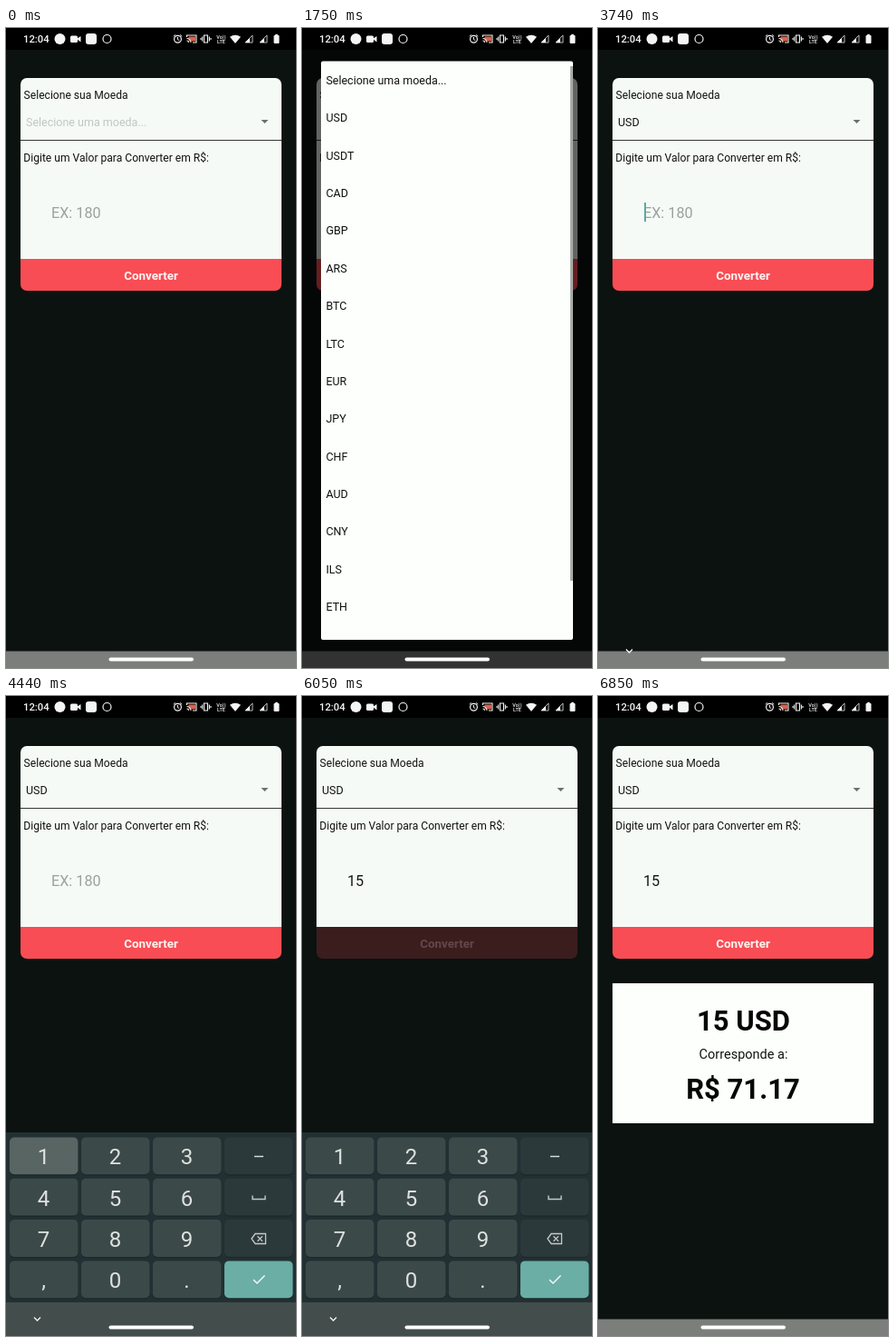
An HTML page with a canvas that plays this animation: 320x704 px, repeating every 8 s.

```html
<!DOCTYPE html>
<html lang="pt">
<head>
<meta charset="utf-8">
<title>Conversor de moedas</title>
<style>
  html, body { margin: 0; width: 100%; height: 100%; overflow: hidden; background: #0b1210; }
  canvas { display: block; }
</style>
</head>
<body>
<canvas id="stage" width="320" height="704"></canvas>
<script>
const ctx = document.getElementById('stage').getContext('2d');
const LOOP = 8000;
const ITEMS = ['Selecione uma moeda...', 'USD', 'USDT', 'CAD', 'GBP', 'ARS', 'BTC', 'LTC',
  'EUR', 'JPY', 'CHF', 'AUD', 'CNY', 'ILS', 'ETH'];
const KEYS = ['1', '2', '3', 'minus', '4', '5', '6', 'space', '7', '8', '9', 'back', ',', '0', '.', 'done'];

const within = (t, a, b) => t >= a && t < b;
const ramp = (t, a, b) => Math.min(1, Math.max(0, (t - a) / (b - a)));
const easeOut = p => 1 - (1 - p) ** 2;

function box(x, y, w, h, radius, fill) {
  ctx.fillStyle = fill;
  ctx.beginPath();
  ctx.roundRect(x, y, w, h, radius);
  ctx.fill();
}

function text(str, x, y, size, color, weight = 400, align = 'left') {
  ctx.font = `${weight} ${size}px Roboto, sans-serif`;
  ctx.textAlign = align;
  ctx.fillStyle = color;
  ctx.fillText(str, x, y);
}

// Strokes or fills an SVG path
function shape(d, color, lineWidth = 0) {
  const path = new Path2D(d);
  ctx.fillStyle = ctx.strokeStyle = color;
  ctx.lineWidth = lineWidth;
  if (lineWidth) ctx.stroke(path);
  else ctx.fill(path);
}

function disc(x, y, r, color, lineWidth = 0) {
  shape(`M${x - r} ${y}a${r} ${r} 0 1 1 ${2 * r} 0a${r} ${r} 0 1 1 ${-2 * r} 0Z`, color, lineWidth);
}

function drawStatusBar() {
  const white = '#f4f6f4';
  text('12:04', 19, 16, 11.3, white, 500);
  disc(59.5, 12, 6, white);
  box(71, 8.5, 8, 7.5, 1.5, white);
  shape('M78 12L82.5 9V15.5Z', white);
  box(88, 6, 12, 12, 3, white);
  disc(111.5, 12, 4.5, white, 1.2);
  // alarm
  disc(189.5, 12.3, 3.9, white, 1.2);
  shape('M189.5 10V12.6L191.3 13.7M184.8 9.4L187 7.4M194.2 9.4L192 7.4', white, 1);
  // cast
  box(201.5, 9.5, 7.5, 5, 0, '#d9604f');
  shape('M199.5 10V8H210V16H206M199.5 11.5A4.5 4.5 0 0 1 204 16M199.5 14A2 2 0 0 1 201.5 16', white, 1.1);
  // vibrate
  shape('M218.5 8H222.5V16H218.5ZM216.6 9.5V14.5M224.4 9.5V14.5M215 11V13M226 11V13', white, 1.1);
  text('Vo))', 237.5, 11.5, 5.5, white, 500, 'center');
  text('LTE', 237.5, 17, 5.5, white, 500, 'center');
  // wifi, signal, battery
  shape('M247 9.8Q253 5.5 259 9.8L253 17Z', white);
  for (const x of [263, 279]) {
    shape(`M${x + 1} 16H${x + 9}V8Z`, '#b9bcb9', 1);
    shape(`M${x + 1} 16H${x + 6}V11Z`, white);
  }
  box(295.5, 8, 6, 9, 1, white);
  box(297.2, 6.8, 2.6, 2, 0, white);
}

function drawForm(t) {
  box(16, 55, 288, 199, [7, 7, 0, 0], '#f5faf7');
  text('Selecione sua Moeda', 19.6, 78, 12.1, '#111');
  text(t < 2680 ? ITEMS[0] : 'USD', 22, 107.5, 12.5, t < 2800 ? '#c2c6c3' : '#151515');
  shape('M281.5 101H289.5L285.5 105Z', '#6c706d');
  box(16, 123, 288, 1, 0, '#333735');
  text('Digite um Valor para Converter em R$:', 19.3, 147, 12.1, '#111');

  const value = t < 4790 ? '' : t < 5350 ? '1' : '15';
  text(value || 'EX: 180', 50, 208.5, 16.2, value ? '#151716' : '#9ba29e');
  if (within(t, 3740, 4220) || within(t, 4790, 5020) || within(t, 5350, 5580)) {
    box(51 + value.length * 9.1, 192, 2, 21, 0, '#5fa89e');
  }

  ctx.globalAlpha = t < 6050 ? 1 : 0.2 + 0.8 * easeOut(ramp(t, 6170, 6420));
  box(16, 254, 288, 35, [0, 0, 7, 7], '#f84d54');
  text('Converter', 160, 277, 13.4, '#fff5f3', 700, 'center');
  ctx.globalAlpha = 1;
}

function drawResult() {
  box(16, 316, 288, 154, 0, '#fdfffd');
  text('15 USD', 160.5, 368, 31, '#050505', 700, 'center');
  text('Corresponde a:', 160.5, 398.5, 14.5, '#111', 400, 'center');
  text('R$ 71.17', 160, 442.5, 31, '#050505', 700, 'center');
}

function drawDialog(t) {
  const closing = t >= 2680;
  const shown = closing ? 0.3 : ramp(t, 1250, 1600);
  ctx.globalAlpha = closing ? 0.46 : 0.6 * shown;
  box(0, 0, 320, 704, 0, '#000');
  ctx.globalAlpha = shown;
  box(21, 36.5, 278, 636.5, 2, '#fdfffc');
  if (closing) box(73, 77, 173, 41, 4, '#e9ece9');
  ITEMS.forEach((name, i) => text(name, 26.4, 62 + i * 41.36, 12.5, '#111'));
  box(296, 42, 3, 566, 0, '#a6a9a6');
  ctx.globalAlpha = 1;
}

function drawKeyboard(t, shown) {
  const ink = '#dde2df';
  const pressed = within(t, 4440, 4790) ? '1' : within(t, 5250, 5350) ? '5' : '';
  ctx.save();
  ctx.translate(0, 224 * (1 - shown));
  box(0, 480, 320, 187, 0, '#223033');
  box(0, 667, 320, 37, 0, '#434d4b');
  KEYS.forEach((key, i) => {
    const x = 4 + (i % 4) * 79;
    const y = 485.5 + Math.floor(i / 4) * 45.3;
    const side = i % 4 === 3;
    const fill = key === 'done' ? '#6aaea5' : key === pressed ? '#586562' : side ? '#2c393b' : '#3c4949';
    box(x, y + 1, 75.5, 41, 5, '#1b2729');
    box(x, y, 75.5, 40.8, 5, fill);
    if (!side) text(key, x + 37.5, y + 29.8, 24, ink, 400, 'center');
  });
  shape('M274 506.5H284', ink, 1.4);
  shape('M272 549.5V553.5H286V549.5', '#c3cac8', 1.4);
  shape('M271 597L275 591.5H286.5V602.5H275ZM277.5 594.2L283 599.8M283 594.2L277.5 599.8', '#c3cac8', 1.3);
  shape('M273 642L277 646L285.5 637.5', '#f2f8f5', 1.5);
  ctx.restore();
}

function draw(t) {
  box(0, 0, 320, 704, 0, '#0b1210');
  box(0, 0, 320, 24, 0, '#000');
  drawForm(t);
  if (t >= 6730) drawResult();
  box(0, 685.5, 320, 18.5, 0, '#7b7e7b');
  if (within(t, 1250, 2800)) drawDialog(t);

  const keyboard = easeOut(ramp(t, 3860, 4160)) - ramp(t, 6220, 6480) ** 2;
  if (keyboard > 0) drawKeyboard(t, keyboard);
  if (within(t, 3740, 6480)) shape('M31 683.5L34.5 687L38 683.5', '#f4f6f4', 1.3);
  drawStatusBar();
  box(113.5, 692.5, 93.5, 4, 2, '#fff');
}

const start = performance.now();
function tick() {
  draw((performance.now() - start) % LOOP);
  requestAnimationFrame(tick);
}
tick();
</script>
</body>
</html>
```
